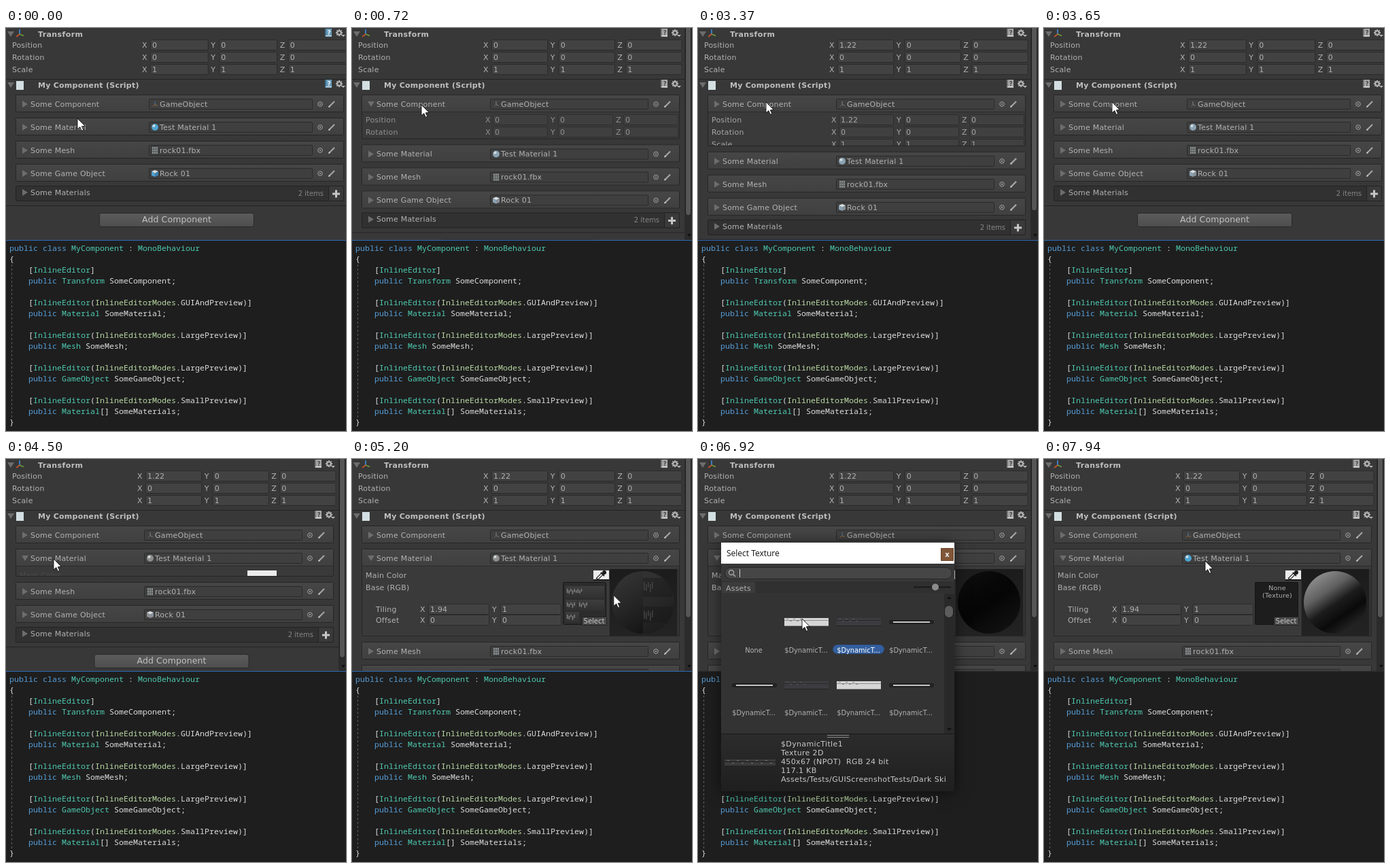
Animation of 500 by 593 pixels, one loop 7.99 s. Source, as an HTML page with a canvas:

```html
<!DOCTYPE html>
<html lang="en">
<head>
<meta charset="utf-8">
<title>Inline editor</title>
<style>
html, body { margin: 0; width: 100%; height: 100%; overflow: hidden; background: #1e1e1e; }
canvas { display: block; width: 500px; height: 593px; }
</style>
</head>
<body>
<canvas id="stage"></canvas>
<script>
const LOOP = 7990;
const canvas = document.getElementById('stage');
const g = canvas.getContext('2d');
const dpr = window.devicePixelRatio || 1;
canvas.width = 500 * dpr;
canvas.height = 593 * dpr;

const UI = '"DejaVu Sans", sans-serif';
const TEXT = '#b2b2b2';

// [time, x, y]
const CURSOR = [
  [0, 105, 133], [30, 105, 133], [340, 102, 113], [860, 102, 113], [1330, 196, 132],
  [1370, 196, 132], [1800, 276, 142], [2120, 205, 143], [2220, 205, 143], [2400, 254, 142],
  [2550, 254, 141], [2910, 100, 109], [3930, 100, 109], [4380, 70, 147], [4920, 70, 147],
  [5380, 441, 210], [5530, 441, 210], [5900, 402, 222], [6280, 354, 237], [6560, 354, 237],
  [6920, 153, 235], [6960, 153, 235], [7130, 68, 242], [7530, 68, 242], [7730, 275, 190], [7940, 237, 150]
];
// [time, value]
const POS_X = [[1370, 0], [1800, 2.09], [2120, 0.3], [2220, 0.3], [2400, 1.22]];
const COMPONENT_H = [[520, 0], [800, 55], [3345, 55], [3625, 0]];
const MATERIAL_H = [[4460, 0], [4740, 103]];

const easeOut = p => 1 - (1 - p) * (1 - p);
const linear = p => p;

function track(keys, t, ease = easeOut) {
  if (t <= keys[0][0]) return keys[0].slice(1);
  for (let i = 1; i < keys.length; i++) {
    const a = keys[i - 1], b = keys[i];
    if (t <= b[0]) {
      const p = ease((t - a[0]) / (b[0] - a[0]));
      return a.slice(1).map((v, k) => v + (b[k + 1] - v) * p);
    }
  }
  return keys[keys.length - 1].slice(1);
}

function rect(x, y, w, h, fill) {
  g.fillStyle = fill;
  g.fillRect(x, y, w, h);
}

function box(x, y, w, h, fill, line, r = 0) {
  g.beginPath();
  g.roundRect(x + .5, y + .5, w - 1, h - 1, r);
  g.fillStyle = fill;
  g.fill();
  g.strokeStyle = line;
  g.lineWidth = 1;
  g.stroke();
}

function poly(points, fill) {
  g.beginPath();
  points.forEach(([x, y]) => g.lineTo(x, y));
  g.closePath();
  g.fillStyle = fill;
  g.fill();
}

function line(x1, y1, x2, y2, color, w = 1) {
  g.beginPath();
  g.moveTo(x1, y1);
  g.lineTo(x2, y2);
  g.strokeStyle = color;
  g.lineWidth = w;
  g.stroke();
}

function disc(x, y, r, fill) {
  g.beginPath();
  g.arc(x, y, r, 0, 7);
  g.fillStyle = fill;
  g.fill();
}

// y is the middle of the line
function text(s, x, y, o = {}) {
  g.font = `${o.bold ? 'bold ' : ''}${o.size || 11}px ${o.family || UI}`;
  g.letterSpacing = (o.space ?? .2) + 'px';
  g.textAlign = o.align || 'left';
  g.fillStyle = o.color || TEXT;
  g.fillText(s, x, y + 4);
}

function vertical(y, h, top, bottom) {
  const f = g.createLinearGradient(0, y, 0, y + h);
  f.addColorStop(0, top);
  f.addColorStop(1, bottom);
  return f;
}

function clip(x, y, w, h, draw) {
  g.save();
  g.beginPath();
  g.rect(x, y, w, h);
  g.clip();
  draw();
  g.restore();
}

function foldout(x, y, open, color = '#6d6d6d') {
  poly(open ? [[x - 5, y - 4], [x + 5, y - 4], [x, y + 4]]
            : [[x - 4, y - 5], [x + 4, y], [x - 4, y + 5]], color);
}

function field(x, y, w, s, focus) {
  box(x, y - 8, w, 16, '#424242', focus ? '#3b5cc4' : '#2b2b2b', 1);
  text(s, x + 3, y);
}

function vector(labels, x, y, pitch, gap, w, values, focus) {
  [...labels].forEach((s, i) => {
    const lx = x + i * pitch, active = focus && i === 0;
    text(s, lx, y, { color: active ? '#4c7ad6' : TEXT });
    field(lx + gap, y, w, values[i], active);
  });
}

function transformRows(x, labelX, y, pitch, gap, w, value, focus) {
  ['Position', 'Rotation', 'Scale'].forEach((s, i) => {
    const v = i === 2 ? '1' : '0';
    text(s, x, y + i * 18);
    vector('XYZ', labelX, y + i * 18, pitch, gap, w, [i ? v : value, v, v], focus && i === 0);
  });
}

function axes(x, y, r, colors, w = 1) {
  line(x, y + 1, x, y - r, colors[0], w);
  line(x, y + 1, x + r, y + r * .6, colors[1], w);
  line(x, y + 1, x - r * .8, y + r * .8, colors[2], w);
}

function gear(x, y) {
  for (let i = 0; i < 4; i++) {
    const a = i * Math.PI / 4, c = Math.cos(a) * 5, s = Math.sin(a) * 5;
    line(x - c, y - s, x + c, y + s, '#b5b5b5', 2);
  }
  disc(x, y, 3.6, '#b5b5b5');
  disc(x, y, 1.8, '#383838');
  poly([[x + 3, y + 3], [x + 9, y + 3], [x + 6, y + 6]], '#b5b5b5');
}

function headerIcons(y, dx, vivid) {
  const x = 469 - dx;
  rect(x, y - 7, 10, 12, vivid ? '#6a9cba' : '#a6a6a6');
  rect(x, y - 7, 2, 12, vivid ? '#3f6f8e' : '#777');
  rect(x + 1, y + 3, 9, 1, '#e2e2e2');
  text('?', x + 6, y - 2.5, { size: 8, bold: true, align: 'center', space: 0, color: vivid ? '#fff' : '#444' });
  gear(490 - dx, y - 1);
}

const icons = {
  axes(x, y, s) {
    axes(x, y, 4, s.vivid ? ['#4a7fa8', '#84703a', '#a8603a'] : ['#7d8a90', '#777', '#666']);
  },
  ball(x, y, s) {
    disc(x, y, 5, s.ball);
    disc(x - 1.5, y - 2, 2, '#d3dce0');
  },
  mesh(x, y) {
    rect(x - 4, y - 5, 8, 10, '#8b9394');
    for (let i = -1; i < 2; i += 2) {
      line(x + i * 1.5, y - 5, x + i * 1.5, y + 5, '#555');
      line(x - 4, y + i * 1.8, x + 4, y + i * 1.8, '#555');
    }
  },
  cube(x, y, s) {
    poly([[x, y - 5], [x + 5, y - 3], [x, y], [x - 5, y - 3]], '#d5dde0');
    poly([[x - 5, y - 3], [x, y], [x, y + 5], [x - 5, y + 3]], s.ball);
    poly([[x + 5, y - 3], [x, y], [x, y + 5], [x + 5, y + 3]], s.vivid ? '#3c7fae' : '#87919a');
  }
};

function objectRow(label, name, icon, y, s, open, extra) {
  const { dx } = s, right = 497 - dx;
  box(14, y - 14, right - 14, 26 + extra, '#3a3a3a', '#262626', 1);
  rect(15, y - 13, right - 16, 24, vertical(y - 13, 24, '#464646', '#404040'));
  if (extra > 0) rect(15, y + 11, right - 16, 1, '#2b2b2b');
  foldout(28, y, open);
  text(label, 36, y);
  const x = 210 - Math.round(dx * .45);
  box(x, y - 8, 451 - dx - x, 16, '#3f3f3f', '#2a2a2a', 1);
  icons[icon](x + 9, y, s);
  text(name, x + 16, y);
  g.beginPath();
  g.arc(462 - dx, y, 3.3, 0, 7);
  g.strokeStyle = '#a5a5a5';
  g.lineWidth = 1;
  g.stroke();
  disc(462 - dx, y, 1.1, '#a5a5a5');
  line(475 - dx, y + 4, 483 - dx, y - 4, '#a5a5a5', 2.2);
  poly([[474 - dx, y + 5], [475 - dx, y + 2], [477 - dx, y + 4]], '#d0d0d0');
}

function sphere(t) {
  rect(379, 162, 99, 99, vertical(162, 99, '#1c1c1c', '#232323'));
  const cx = 428, cy = 211, r = 46;
  g.save();
  g.beginPath();
  g.arc(cx, cy, r, 0, 7);
  g.clip();
  const lit = t >= 7130;
  const shade = g.createLinearGradient(cx - 26, cy - 38, cx + 26, cy + 38);
  const stops = lit ? ['#8a8a8a', '#606060', '#1c1c1c', '#0a0a0a', '#262626'] : t < 5700
    ? ['#323232', '#2a2a2a', '#222', '#1a1a1a', '#101010']
    : ['#0c0c0c', '#070707', '#050505', '#0b0b0b', '#101010'];
  stops.forEach((c, i) => shade.addColorStop([0, .28, .52, .75, 1][i], c));
  rect(cx - r, cy - r, r * 2, r * 2, shade);
  if (t < 6280) {
    // seam of the tiled texture, carried round by the drag
    const x = cx + track([[5530, 0], [6280, 62]], t)[0];
    rect(x, cy - r, r, r * 2, 'rgba(62,62,62,.3)');
    [[-36, 28], [6, 24]].forEach(([y, h]) => {
      rect(x, cy + y, 44, h, 'rgba(24,24,24,.4)');
      for (let i = 0; i < 5; i++) rect(x + 1 + i * 3, cy + y + 6 + i % 2 * 3, 1.5, 12 - i % 3 * 2, '#434343');
    });
  }
  g.restore();
}

function textureSlot(none) {
  box(310, 181, 64, 63, none ? '#1d1d1d' : '#2c2c2c', '#151515', 1);
  if (none) {
    ['None', '(Texture)'].forEach((s, i) => text(s, 343, 189 + i * 11, { size: 9.5, align: 'center' }));
  } else {
    [[314, 187, 57, 18], [314, 207, 17, 16], [332, 207, 39, 16], [314, 225, 20, 16]].forEach(([x, y, w, h], k) => {
      rect(x, y, w, h, vertical(y, h, '#3e3e3e', '#303030'));
      for (let i = 0; i < (k ? 5 : 9); i++) rect(x + 2 + i * 2.6, y + 4 + i % 2 * 2, 1.4, 6 - i % 3, '#858585');
    });
  }
  box(338, 232, 37, 13, '#4b4b4b', '#222', 1);
  text('Select', 356, 238, { size: 10, align: 'center', space: 0, color: '#c8c8c8' });
}

function eyedropper(x, y) {
  line(x, y + 12, x + 8, y + 4, '#1a1a1a', 4);
  line(x + 1, y + 11, x + 8, y + 4, '#f4f4f4', 1.8);
  line(x + 6, y + 2, x + 11, y + 7, '#1a1a1a', 2);
  disc(x + 11, y + 2, 3, '#1a1a1a');
}

function materialBody(t, h) {
  g.globalAlpha = h / 103;
  text('Main Color', 20, 171);
  text('Base (RGB)', 20, 189);
  [['Tiling', 221, '1.94', '1'], ['Offset', 237, '0', '0']].forEach(([s, y, a, b]) => {
    text(s, 35, y);
    vector('XY', 100, y, 106, 12, 90, [a, b]);
  });
  textureSlot(t >= 7130);
  g.globalAlpha = 1;
  rect(355, 164, 43, 14, '#ececec');
  if (h < 40) return;
  rect(355, 177, 24, 2, '#1c1c1c');
  eyedropper(360, 165);
  rect(378, 162, 103, 99, '#333');
  sphere(t);
}

function scrollbar(extra) {
  rect(489, 0, 11, 312, '#2b2b2b');
  const bottom = 303 - .67 * extra;
  box(490, -6, 9, bottom + 6, '#565656', '#202020', 4);
  poly([[493, 303], [499, 303], [496, 307]], '#0f0f0f');
}

function inspector(t) {
  const comp = track(COMPONENT_H, t, linear)[0];
  const mat = track(MATERIAL_H, t, linear)[0];
  const extra = comp + mat;
  const dx = extra > 4 ? 15 : 0;
  const vivid = t < 540 || t >= 6470;
  const s = { dx, vivid, ball: vivid ? '#4ea3d0' : t < 4400 ? '#8ba3b4' : '#8e8e8e' };
  const value = String(+track(POS_X, t)[0].toFixed(2));
  const labelX = 200 - Math.round(dx * .45);
  const pitch = (504 - dx - labelX) / 3;

  rect(0, 0, 500, 312, '#383838');
  foldout(7, 9, true);
  axes(20, 8, 6, ['#3f8fe0', '#6f9a35', '#d0552a'], 1.6);
  text('Transform', 47, 9, { bold: true, space: .4, color: '#c0c0c0' });
  headerIcons(8, dx, t < 540);
  transformRows(9, labelX, 25, pitch, 12, pitch - 15.5, value);

  rect(0, 75, 500, 1, '#242424');
  foldout(7, 84, true);
  rect(15, 78, 11, 13, '#d3dfe2');
  text('My Component (Script)', 47, 84, { bold: true, space: .25, color: '#c0c0c0' });
  headerIcons(83, dx, t < 540);

  objectRow('Some Component', 'GameObject', 'axes', 112, s, t >= 520 && t < 3345, comp);
  if (comp > 0) clip(15, 125, 466, comp - 2, () => {
    g.globalAlpha = comp / 55;
    transformRows(20, 196, 135, 96, 11, 81, value, t >= 1340 && t < 2600);
    g.globalAlpha = 1;
  });
  objectRow('Some Material', 'Test Material 1', 'ball', 146 + comp, s, t >= 4440, mat);
  if (mat > 0) clip(15, 159, 466, mat - 2, () => materialBody(t, mat));
  objectRow('Some Mesh', 'rock01.fbx', 'mesh', 180 + extra, s, false, 0);
  objectRow('Some Game Object', 'Rock 01', 'cube', 214 + extra, s, false, 0);

  const y = 242 + extra, right = 497 - dx;
  box(14, y - 10, right - 14, 23, '#313131', '#232323', 1);
  foldout(28, y, false);
  text('Some Materials', 36, y);
  text('2 items', 467 - dx, y + 1, { size: 10, align: 'right', space: 0, color: '#858585' });
  box(474 - dx, y - 10, 23, 23, '#3a3a3a', '#232323', 1);
  rect(480 - dx, y + .5, 11, 3, '#c6c6c6');
  rect(484 - dx, y - 3.5, 3, 11, '#c6c6c6');

  rect(0, 261 + extra, 500, 1, '#242424');
  const addX = 137 - dx / 2, addY = 272 + extra;
  box(addX, addY, 228, 21, vertical(addY, 21, '#5c5c5c', '#4d4d4d'), '#282828', 3);
  text('Add Component', addX + 114, addY + 10, { size: 12.5, align: 'center', space: .1, color: '#c2c2c2' });
  if (dx) scrollbar(extra);
}

const SYNTAX = { k: '#569cd6', t: '#4ec9b0', e: '#b8d7a3', w: '#dcdcdc' };
const attr = mode => `w:[|t:InlineEditor|w:(|e:InlineEditorModes|w:.${mode})]`;
const member = (type, name, array = '') => `k:public |t:${type}|w:${array} ${name};`;
// row, indent, coloured runs
const CODE = [
  [0, 0, 'k:public class |t:MyComponent|w: : |t:MonoBehaviour'], [1, 0, 'w:{'],
  [2, 4, 'w:[|t:InlineEditor|w:]'], [3, 4, member('Transform', 'SomeComponent')],
  [5, 4, attr('GUIAndPreview')], [6, 4, member('Material', 'SomeMaterial')],
  [8, 4, attr('LargePreview')], [9, 4, member('Mesh', 'SomeMesh')],
  [11, 4, attr('LargePreview')], [12, 4, member('GameObject', 'SomeGameObject')],
  [14, 4, attr('SmallPreview')], [15, 4, member('Material', 'SomeMaterials', '[]')], [16, 0, 'w:}']
];

function code(t) {
  rect(0, 312, 500, 281, '#1e1e1e');
  rect(0, 312, 500, 1, t < 6470 ? '#2c68b4' : '#2a2a2a');
  g.setLineDash([3, 3]);
  line(8.5, 348, 8.5, 574, '#606060');
  g.setLineDash([]);
  CODE.forEach(([row, indent, runs]) => {
    let x = 5 + indent * 7;
    runs.split('|').forEach(run => {
      const s = run.slice(2);
      text(s, x, 324 + row * 16, { size: 11.667, space: 0, family: '"Noto Sans Mono", monospace', color: SYNTAX[run[0]] });
      x += s.length * 7;
    });
  });
}

function strip(kind, x, y) {
  if (kind === 'thin') {
    box(x, y - 3, 66, 6, '#242424', '#1c1c1c', 2);
    rect(x + 6, y - 1, 54, 2, '#c4c4c4');
    return;
  }
  const light = kind === 'light';
  rect(x, y - 6, 65, 12, light ? '#d6d6d6' : '#3c3c40');
  rect(x, y - 3, 65, 1, light ? '#8e8e8e' : '#29292c');
  rect(x, y + 5, 65, 1, light ? '#999' : '#222');
  for (let i = 0; i < 6; i++) rect(x + 3 + i * 5, y - 5 + i % 2 * 3, 3, 1, light ? '#888' : '#58585c');
}

function picker(t) {
  g.save();
  g.globalAlpha = Math.min(1, (t - 6450) / 130);
  g.shadowColor = 'rgba(0,0,0,.55)';
  g.shadowBlur = 20 * dpr;
  g.shadowOffsetY = 2 * dpr;
  rect(34, 123, 343, 366, '#333');
  g.shadowColor = 'transparent';

  rect(34, 123, 343, 31, '#fff');
  text('Select Texture', 42, 139, { size: 12, space: 0, family: '"Open Sans", sans-serif', color: '#111' });
  box(357, 131, 19, 19, '#805638', '#6b452b');
  text('x', 366.5, 139.5, { size: 10, bold: true, align: 'center', space: 0, color: '#eee' });

  rect(34, 154, 343, 43, '#383838');
  box(39, 159, 335, 18, '#464646', '#252525', 9);
  g.beginPath();
  g.arc(49, 167, 3.5, 0, 7);
  g.strokeStyle = '#aaa';
  g.lineWidth = 1.3;
  g.stroke();
  line(51.5, 169.5, 55, 173, '#aaa', 1.5);
  rect(61, 162, 1, 12, '#d0d0d0');
  rect(34, 180, 343, 17, '#303030');
  rect(35, 181, 49, 16, '#3c3c3c');
  text('Assets', 41, 190);
  line(317, 188.5, 372, 188.5, '#191919', 2);
  disc(349, 188.5, 5, '#8c8c8c');

  rect(34, 197, 343, 208, '#333');
  const picked = t < 7130 ? 2 : 0;
  ['', 'light', 'dark', 'thin', 'thin', 'dark', 'light', 'thin'].forEach((kind, i) => {
    const x = 82 + i % 4 * 77, row = i >> 2;
    if (kind) strip(kind, x - 32, 240 + row * 93);
    const chosen = i === picked;
    if (chosen) box(x - 38, 273, 76, 14, '#345f9e', '#2a4d82', 7);
    text(kind ? '$DynamicT...' : 'None', x, 281 + row * 92,
      { size: 9.8, align: 'center', space: 0, color: chosen ? '#fff' : TEXT });
  });
  rect(362, 198, 15, 206, '#292929');
  box(362, 215, 14, 19, '#5c5c5c', '#1e1e1e', 7);
  poly([[366, 206], [373, 206], [369.5, 202]], '#111');
  poly([[366, 396], [373, 396], [369.5, 400]], '#111');

  rect(34, 404, 343, 85, vertical(404, 85, '#2c2c2c', '#1f1f1f'));
  rect(34, 404, 343, 1, '#191919');
  rect(190, 406, 32, 1, '#8a8a8a');
  rect(190, 409, 32, 1, '#8a8a8a');
  if (picked) {
    rect(39, 442, 75, 9, '#3b3b3b');
    rect(39, 445, 75, 1, '#1d1d1d');
    for (let i = 0; i < 10; i++) rect(43 + i * 7, 443 + i % 2 * 4, 3, 1, '#707070');
  }
  const info = picked ? ['$DynamicTitle1', 'Texture 2D', '450x67 (NPOT)  RGB 24 bit', '117.1 KB',
    'Assets/Tests/GUIScreenshotTests/Dark Ski'] : ['None'];
  clip(34, 404, 338, 85, () =>
    info.forEach((s, i) => text(s, 122, 419 + i * 13, { space: .35, color: '#c8c8c8' })));
  g.restore();
}

function pointer(x, y) {
  const shape = [[0, 0], [0, 16], [3.8, 12.6], [6.4, 18.3], [8.8, 17.2], [6.3, 11.8], [11.3, 11.4]];
  g.beginPath();
  shape.forEach(([a, b]) => g.lineTo(x + a, y + b));
  g.closePath();
  g.fillStyle = '#fff';
  g.fill();
  g.strokeStyle = '#111';
  g.lineWidth = .9;
  g.stroke();
}

function draw(t) {
  g.setTransform(dpr, 0, 0, dpr, 0, 0);
  clip(0, 0, 500, 312, () => inspector(t));
  code(t);
  if (t >= 6470 && t < 7380) picker(t);
  pointer(...track(CURSOR, t));
}

const start = performance.now();
function frame() {
  draw((performance.now() - start) % LOOP);
  requestAnimationFrame(frame);
}
frame();
</script>
</body>
</html>
```
